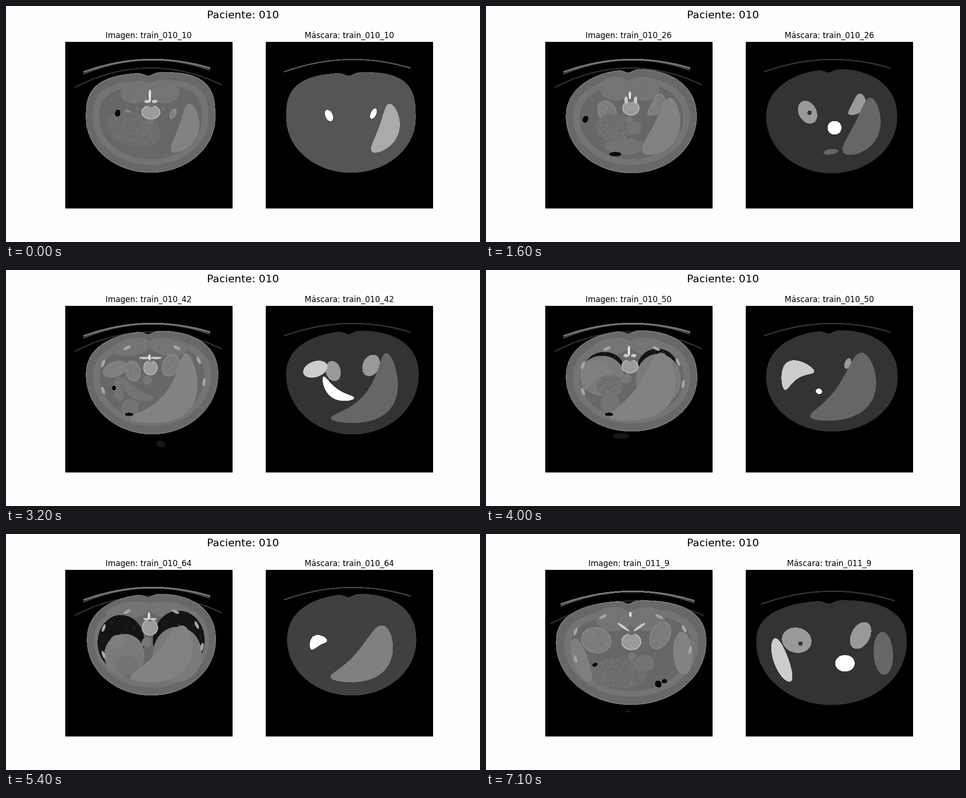
Write a matplotlib script that moves like this. It is 1000 px wide and 500 px high and loops after 7200 ms.

```python
import numpy as np
import matplotlib.pyplot as plt
from matplotlib.animation import FuncAnimation
from matplotlib.patches import Polygon
from matplotlib.path import Path

FRAMES, SECOND, FIRST_SLICE = 72, 62, 10
SHIFT = 423                     # distance between the two panels
T = np.linspace(0, 2 * np.pi, 160, endpoint=False)

# Drawing order and grey level of each tissue in the scan panel
TONES = dict(debris=24, body=118, fat=104, muscle=116, inner=103, back=116,
             psoas=116, lobe=126, kidney=123, lung=20, dome=122, bowel=108,
             vessel=119, stomach=115, spleen=127, pancreas=116, liver=130,
             hole=118, rib=165, spine=155, canal=108, lamina=200, spike=225,
             gas=8)
RIMS = dict(kidney=(132, 1.2), spine=(180, .8))
LABELS = dict(body=1, hole=1, liver=2, lobe=2, kidney=3, spleen=4, pancreas=5)
SPECKS = dict(back=(40, 124), bowel=(220, 121), lung=(50, 50), liver=(15, 142),
              kidney=(30, 142))

# First and last frame of parts that do not last for a whole patient
SPANS = (dict(lobe=(9, 24), hole=(11, 21), psoas=(0, 12), pancreas=(10, 45),
              kidney0=(-9, 38), kidney1=(-9, 45), spleen=(27, 61), rib=(24, 99),
              lung=(35, 99), dome=(35, 99), stomach=(9, 99), gas0=(-9, 36),
              gas1=(10, 46), debris=(26, 44)),
         dict(hole=(66, 99), pancreas=(66, 99), kidney1=(64, 99), rib=(66, 99),
              psoas=(-9, 68)))
GROWTH = 6                      # frames a part needs to appear or vanish
tracks = {}


def grey(level):
    return (level / 255,) * 3


def kind(name):
    return name.rstrip("0123456789")


def oval(cx, cy, rx, ry, tilt=0, bend=0, taper=0):
    """Ellipse whose long axis can be bent to a bow and whose ends can differ."""
    along = -np.cos(T)
    x = rx * np.sin(T) * (1 + taper * along) + bend * along**2
    y, r = ry * along, np.radians(tilt)
    return np.c_[cx + x*np.cos(r) - y*np.sin(r), cy + x*np.sin(r) + y*np.cos(r)]


def scale(outline, sx, sy):
    mid = (outline.min(0) + outline.max(0)) / 2
    return mid + (outline - mid) * (sx, sy)


def add(name, frame, outline):
    tracks.setdefault((name, frame >= SECOND), {})[frame] = outline


def part(name, **specs):
    """Ovals by frame, given as at0=(...), at16=(...)."""
    for when, spec in specs.items():
        add(name, int(when[2:]), oval(*spec))


def pair(name, frame, cx, dx, cy, rx, ry, tilt=0):
    add(name + "0", frame, oval(cx - dx, cy, rx, ry, tilt))
    add(name + "1", frame, oval(cx + dx, cy, rx, ry, -tilt))


def torso(frame, left, right, top, bottom, waist, square):
    """Two half superellipses with a groove along the back, and its layers."""
    cx, rx = (left + right) / 2, (right - left) / 2
    u, upper = np.sin(T), np.cos(T) > 0
    n = np.where(upper, square, 2)
    v = (1 - np.abs(u)**n).clip(0)**(1 / n)
    x = cx + rx * u
    groove = 7 * np.exp(-((x - 724) / 12)**2) - 5 * u * v
    y = np.where(upper, waist - (waist - top) * v + groove,
                 waist + (bottom - waist) * v)
    skin = np.c_[x, y]
    add("body", frame, skin)
    for name, sx, sy in (("fat", .987, .98), ("muscle", .89, .84),
                         ("inner", .79, .73)):
        add(name, frame, scale(skin, sx, sy) - (SHIFT, 0))
    # Ribs lie along a ring inside the muscle
    for i, angle in enumerate((62, 118, 28, 158, -10, 202)):
        c, s = np.cos(np.radians(angle)), np.sin(np.radians(angle))
        height = waist - top if s > 0 else bottom - waist
        add(f"rib{i}", frame, oval(cx - SHIFT + .8 * rx * c,
                                   waist - .7 * height * s, 2.5, 8, -angle))


torso(0, 592, 865, 141, 353, 237, 3)
torso(16, 592, 868, 134, 354, 235, 2.2)
torso(32, 592, 871, 129, 348, 222, 2.3)
torso(40, 592, 869, 128, 342, 228, 2.3)
torso(54, 594, 866, 127, 342, 225, 2.3)
torso(62, 568, 888, 143, 358, 217, 2.6)
torso(71, 571, 888, 141, 362, 230, 2.5)

# Labelled organs, in mask panel coordinates
part("liver", at0=(808, 264, 21, 54, 20, -15), at16=(803, 262, 27, 65, 25, -18, .1),
     at32=(784, 279, 30, 91, 41, -48, -.2), at40=(772, 270, 37, 88, 41, -36, -.3),
     at54=(765, 274, 33, 79, 48, -29, -.35), at62=(841, 248, 10, 25, -17),
     at71=(839, 253, 20, 45, -3))
part("lobe", at16=(728, 309, 15, 5, -8))
part("kidney0", at0=(682, 232, 7, 12, -25), at16=(679, 225, 18, 25, -28),
     at32=(691, 214, 15, 21, -15), at62=(658, 231, 19, 23, -35),
     at71=(656, 225, 31, 26, 15))
part("kidney1", at0=(776, 228, 5, 11, 25), at16=(786, 212, 13, 25, 32, -7, -.2),
     at32=(771, 202, 17, 23, 25), at40=(764, 198, 6, 11, 20),
     at71=(791, 215, 19, 30, 28))
part("hole", at16=(683, 226, 4, 4), at71=(664, 232, 4, 4))
part("spleen", at32=(653, 210, 26, 16, -20), at40=(648, 212, 20, 37, 58, 23),
     at54=(656, 226, 11, 19, 60, 8), at62=(632, 281, 8, 36, -30),
     at71=(623, 268, 15, 48, -20, 3))
part("pancreas", at16=(736, 258, 14, 14), at32=(694, 261, 10, 39, -55, 14),
     at40=(703, 257, 6, 5, 20), at71=(758, 274, 20, 17))

# Spine: frame, centre, body (y, rx, ry), spike (y, ry), lamina (dx, y, rx, ry, tilt)
for frame, x, (y, rx, ry), (tip, high), lamina in (
        (0, 306, (225, 19, 14), (190, 13), (8, 202, 5, 3)),
        (16, 306, (216, 17, 15), (189, 8), (10, 199, 3, 7)),
        (32, 305, (207, 14, 15), (185, 6), (12, 186, 11, 2)),
        (40, 304, (204, 17, 14), (171, 10), (8, 181, 5, 3)),
        (54, 304, (198, 16, 16), (173, 7), (7, 180, 6, 2)),
        (62, 306, (238, 23, 15), (185, 17), (12, 206, 6, 4, -30)),
        (71, 307, (228, 20, 17), (170, 5), (17, 197, 14, 2, 35))):
    add("spine", frame, oval(x, y, rx, ry))
    add("canal", frame, oval(x, y - ry - 3, .45 * rx, 5))
    add("spike", frame, oval(x - 2, tip, 2, high))
    pair("lamina", frame, x, *lamina)

# Remaining scan-only tissue
for frame, *spec in ((0, 32, 183, 30, 23), (16, 30, 175, 32, 25),
                     (32, 38, 163, 40, 18, -10), (40, 40, 163, 42, 18, -10),
                     (54, 45, 162, 48, 17, -10), (62, 38, 182, 34, 22),
                     (71, 35, 180, 38, 25)):
    pair("back", frame, 304, *spec)
pair("psoas", 0, 305, 28, 218, 18, 20)
pair("psoas", SECOND, 305, 33, 222, 20, 22)
part("bowel", at0=(270, 262, 58, 34, 15), at16=(270, 258, 38, 30),
     at32=(238, 252, 12, 26), at40=(262, 245, 28, 22), at54=(258, 280, 22, 20),
     at62=(310, 312, 60, 24), at71=(280, 295, 60, 32))
part("vessel0", at0=(305, 244, 6, 6), at16=(303, 241, 7, 7),
     at40=(297, 230, 10, 10), at62=(307, 265, 8, 8), at71=(308, 259, 8, 8))
part("vessel1", at62=(350, 268, 24, 18), at71=(330, 276, 18, 14))
part("stomach", at16=(293, 297, 42, 16), at32=(262, 292, 18, 18),
     at40=(262, 282, 20, 22), at54=(256, 278, 24, 20))

# Each lung is a disc whose lower part is hidden by the dome below it
part("lung0", at40=(250, 212, 42, 38), at54=(243, 230, 49, 58))
part("lung1", at40=(362, 208, 42, 41), at54=(365, 225, 54, 62))
part("dome0", at40=(245, 224, 46, 42), at54=(250, 256, 42, 44))
part("dome1", at40=(364, 232, 47, 54), at54=(362, 255, 51, 58))

part("gas0", at0=(236, 227, 5, 7, 10), at16=(210, 240, 5, 7, 20),
     at32=(228, 250, 4, 5), at62=(322, 330, 4, 3), at71=(364, 318, 6, 7, -30))
part("gas1", at16=(273, 314, 12, 4), at32=(260, 306, 8, 3),
     at62=(353, 324, 5, 4), at71=(377, 312, 5, 4))
part("gas2", at62=(208, 245, 3, 3), at71=(230, 277, 5, 3, -20))
part("debris", at32=(327, 369, 10, 6, 25), at40=(285, 352, 20, 6),
     at62=(310, 374, 32, 4, -8), at71=(300, 376, 5, 2))


def outline_at(name, frame):
    second = frame >= SECOND
    track = tracks.get((name, second))
    spans = SPANS[second]
    start, end = spans.get(name, spans.get(kind(name), (-9, 99)))
    if not track or not start <= frame <= end:
        return None
    a = max((k for k in track if k <= frame), default=min(track))
    b = min((k for k in track if k >= frame), default=max(track))
    mix = (frame - a) / (b - a) if b > a else 0
    size = min(1, (frame - start + 1) / GROWTH, (end - frame + 1) / GROWTH)
    return scale(track[a] * (1 - mix) + track[b] * mix, size, size)


def arc(x0, y0, x1, y1, x2, y2):
    x = np.linspace(x0, x2, 80)
    return x, np.polyval(np.polyfit((x0, x1, x2), (y0, y1, y2), 2), x)


fig, (scan, mask) = plt.subplots(1, 2, figsize=(10, 5), dpi=100,
                                 facecolor="#fefefe")
fig.suptitle("Paciente: 010", fontsize=16)
for ax, left in (scan, 125), (mask, 125 + SHIFT):
    ax.imshow([[0]], cmap="gray", vmin=0, vmax=1,
              extent=(left, left + 353, 429, 76))
    ax.axis("off")
    ax.autoscale(False)


def line(ax, tone, width, x, y):
    return ax.plot(x, y, color=grey(tone), lw=width, zorder=1,
                   antialiased=False)[0]


# Table and mat of each patient
mask_lines, scan_lines = [], []
for table, mat in (((588, 139, 728, 113, 853, 131), (145, 172, 305, 131, 456, 167)),
                   ((582, 148, 730, 121, 862, 141), (137, 190, 298, 142, 459, 172))):
    x, y = arc(*table)
    sag = 1 + 3 * np.linspace(-1, 1, len(x))**2
    mask_lines.append(line(mask, 85, 1.2, x, y))
    scan_lines.append([line(scan, 46, 1.1, *arc(*mat)),
                       line(scan, 75, 1.2, x - SHIFT, y + sag),
                       line(scan, 120, 1.4, x - SHIFT, y)])

names = sorted({name for name, _ in tracks},
               key=lambda n: list(TONES).index(kind(n)))
scan_parts, mask_parts, specks = {}, {}, {}
for z, name in enumerate(names, 2):
    tissue = kind(name)
    rim, width = RIMS.get(tissue, (0, 0))
    scan_parts[name] = scan.add_patch(Polygon(
        [(0, 0)] * 3, fc=grey(TONES[tissue]), ec=grey(rim), lw=width,
        zorder=z, antialiased=False))
    if tissue in LABELS:
        mask_parts[name] = mask.add_patch(Polygon(
            [(0, 0)] * 3, lw=0, zorder=z, antialiased=False))
    if tissue in SPECKS:
        specks[name] = scan.scatter([], [], s=1.3, marker="s", linewidths=0,
                                    color=grey(SPECKS[tissue][1]), zorder=z + .5)


def scatter_inside(outline, count, rng):
    points = rng.uniform(outline.min(0), outline.max(0), (count, 2))
    return points[Path(outline).contains_points(points)]


def update(frame):
    second = frame >= SECOND
    rng = np.random.default_rng(frame)
    shapes = {name: outline_at(name, frame) for name in names}
    # Label greys stretch to the highest label in the slice
    top = max(LABELS.get(kind(n), 0) for n, s in shapes.items() if s is not None)
    for name, shape in shapes.items():
        tissue = kind(name)
        for artists in (scan_parts, mask_parts, specks):
            if name in artists:
                artists[name].set_visible(shape is not None)
        if shape is None:
            continue
        local = shape - (SHIFT, 0) if tissue in LABELS else shape
        scan_parts[name].set_xy(local)
        if name in mask_parts:
            mask_parts[name].set_xy(shape)
            mask_parts[name].set_color(grey(255 * LABELS[tissue] / top))
        if name in specks:
            specks[name].set_offsets(
                scatter_inside(local, SPECKS[tissue][0], rng))
    for n in range(2):
        mask_lines[n].set_color(grey(255 / top))
        for stroke in (mask_lines[n], *scan_lines[n]):
            stroke.set_visible(n == second)
    label = (f"train_011_{frame - SECOND}" if second
             else f"train_010_{frame + FIRST_SLICE}")
    scan.set_title(f"Imagen: {label}")
    mask.set_title(f"Máscara: {label}")


anim = FuncAnimation(fig, update, frames=FRAMES, interval=100,
                     init_func=lambda: update(0), repeat=True, repeat_delay=0)
plt.show()
```
